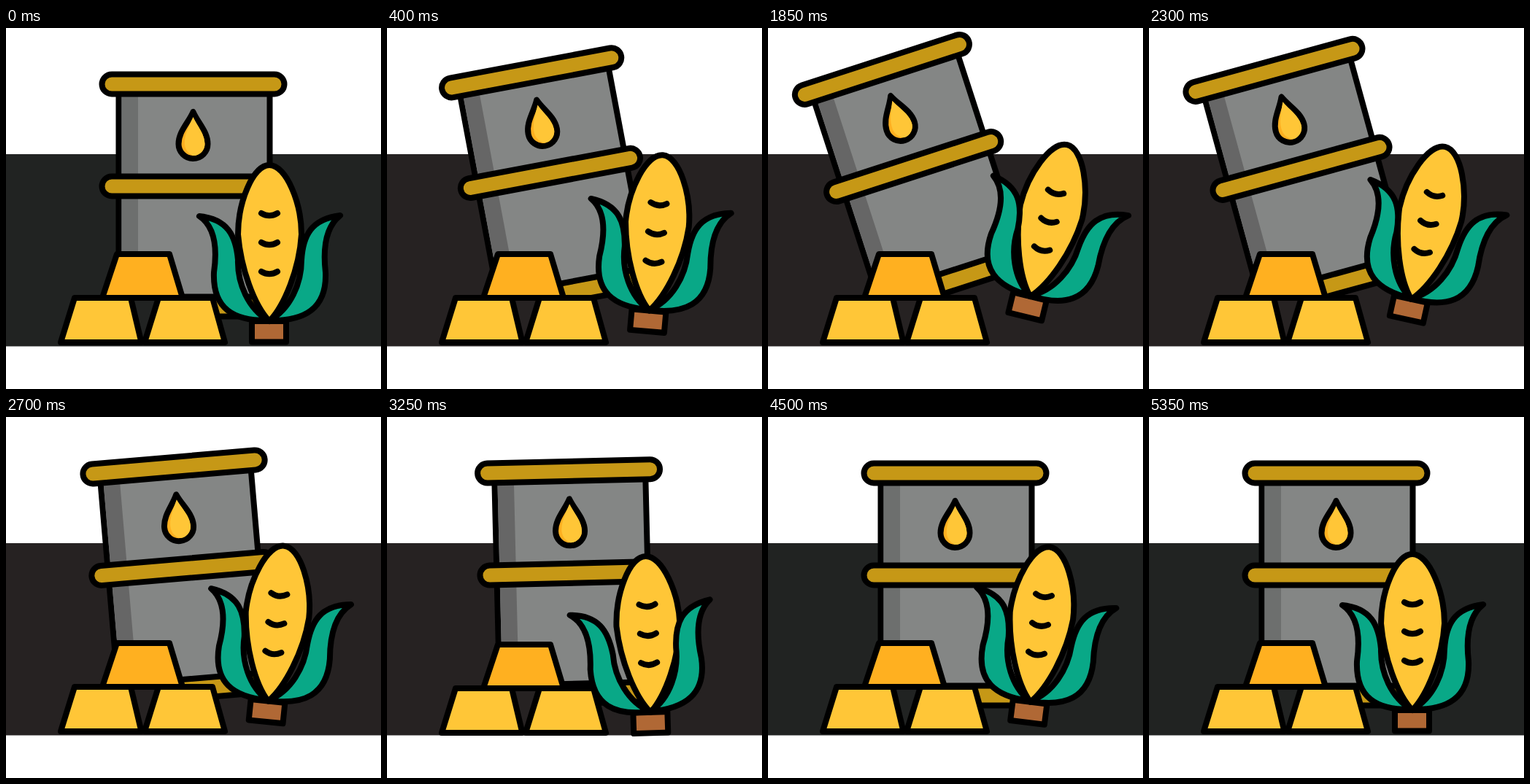
Recreate the animation shown at these times as an HTML page. Size 514 px wide and 495 px high, loop 5400 ms.

```html
<!DOCTYPE html>
<html lang="en">
<head>
<meta charset="utf-8">
<title>Commodities</title>
<style>
html, body { margin: 0; width: 100%; height: 100%; overflow: hidden; background: #fff; }
svg { display: block; }
.line { stroke: #000; stroke-width: 8; stroke-linejoin: round; stroke-linecap: round; }
.gold { fill: #ffc637; }
.band { fill: #c69816; }
.leaf { fill: #09a887; }
</style>
</head>
<body>
<svg width="514" height="495" viewBox="0 0 514 495">
  <rect class="ground" y="173" width="514" height="263.5"/>

  <g id="barrel" class="line">
    <rect x="154.500" y="80" width="207" height="300" fill="#848685"/>
    <rect id="shade" x="158.500" y="90" width="22.500" height="280" stroke="none"/>
    <rect class="band" x="131.500" y="63.500" width="250" height="27" rx="13.500"/>
    <rect class="band" x="131.500" y="203.500" width="250" height="27" rx="13.500"/>
    <rect class="band" x="131.500" y="368.500" width="250" height="27" rx="13.500"/>
    <path fill="#ffb020" d="M256.500 115C250 130 236.500 142 236.500 159A20 20 0 0 0 276.500 159C276.500 142 263 130 256.500 115Z"/>
    <path class="gold" stroke="none" d="M256.500 122C249 138 244 148 245 160C246 168 251 173 257 175A16 16 0 0 0 272.500 159C272.500 146 262 134 256.500 122Z"/>
  </g>

  <g class="line">
    <g id="lowBars">
      <path class="ground" stroke="none" d="M170 368H212L188 431Z"/>
      <path class="gold" d="M94 370H171L185.500 431H75Z"/>
      <path class="gold" d="M209 370H283L300 431H190Z"/>
    </g>
    <path id="topBar" fill="#ffb020" d="M152 310H224L242 370H132Z"/>
  </g>

  <g id="corn" class="line">
    <rect x="337" y="402" width="47" height="28.500" fill="#b06835"/>
    <path class="gold" d="M361 188C338 188 318 240 318 283C322 330 340 380 361 402C382 380 402 330 405 283C405 240 384 188 361 188Z"/>
    <path fill="none" d="M350 254Q361 260.500 372 254M350 294Q361 300.500 372 294M350 334Q361 340.500 372 334"/>
    <g id="leaves">
      <path class="leaf" d="M265 258C304 262 315 285 318 318C317 350 332 385 360 401C312 402 283 385 285 335C290 300 286 272 265 258Z"/>
      <path class="leaf" d="M458 257C418 262 407 285 405 318C405 350 390 385 361 401C409 402 440 385 438 335C434 300 439 272 458 257Z"/>
    </g>
  </g>
</svg>
<script>
const LOOP = 5400;
const $ = id => document.getElementById(id);
const grounds = document.querySelectorAll('.ground');

// Smooth curve through [time, value] keys that never overshoots them
function track(...keys) {
  const rise = keys.slice(1).map(([t, v], i) => (v - keys[i][1]) / (t - keys[i][0]));
  const slope = keys.map((_, i) => {
    const a = rise[i - 1] || 0, b = rise[i] || 0;
    return a * b > 0 ? 2 * a * b / (a + b) : 0;
  });
  return t => {
    let i = 0;
    while (i < keys.length - 2 && t >= keys[i + 1][0]) i++;
    const [t0, v0] = keys[i], [t1, v1] = keys[i + 1], d = t1 - t0;
    const u = Math.min(1, Math.max(0, (t - t0) / d)), w = 1 - u;
    return v0 * w * w * (1 + 2 * u) + v1 * u * u * (3 - 2 * u)
      + d * u * w * (slope[i] * w - slope[i + 1] * u);
  };
}

const tilt = track([0, 0], [400, 10.6], [550, 13], [1200, 17.1], [1800, 18], [2100, 17.9],
  [2200, 17.3], [2550, 7.8], [2700, 4.9], [2800, 3.2], [3300, 1.2], [3600, 0], [LOOP, 0]);
const lean = track([0, 0], [400, 5], [550, 7.2], [1200, 12.2], [1850, 13.7], [2150, 13.6],
  [2700, 5.8], [3350, -2.2], [3850, -2.1], [4420, 7.5], [5000, 0.6], [LOOP, 0]);
const lift = track([0, 0], [400, 14.5], [550, 20], [1200, 33], [1850, 34], [2150, 33.5],
  [2700, 12.5], [3300, -3], [3850, 0], [4420, 12], [5000, 0.5], [LOOP, 0]);
const flare = track([0, 0], [400, 1.2], [1200, 3], [1850, 3], [2700, 1],
  [3350, -4.5], [3850, -4.3], [4420, 1.6], [5000, 0], [LOOP, 0]);
const hop = track([2750, 0], [3300, -2], [3850, 4], [4400, 0], [LOOP, 0]);

const place = (id, transform) => $(id).setAttribute('transform', transform);

function draw(now) {
  const t = now % LOOP, angle = tilt(t), up = hop(t);
  place('barrel', `rotate(${-angle} 143 383)`);
  place('corn', `translate(${-1.5 * Math.min(1, lift(t) / 12)} ${-lift(t)}) rotate(${lean(t)} 360.5 402)`);
  place('leaves', `rotate(${flare(t)} 360.5 402)`);
  place('lowBars', `translate(0 ${-up})`);
  place('topBar', `translate(0 ${-(up > 0 ? 2.2 * up : up)})`);
  const tilted = angle > 1;
  grounds.forEach(g => g.setAttribute('fill', tilted ? '#262222' : '#212322'));
  $('shade').setAttribute('fill', tilted ? '#666666' : '#6d6f6e');
  requestAnimationFrame(() => draw(performance.now() - start));
}
const start = performance.now();
draw(0);
</script>
</body>
</html>
```
